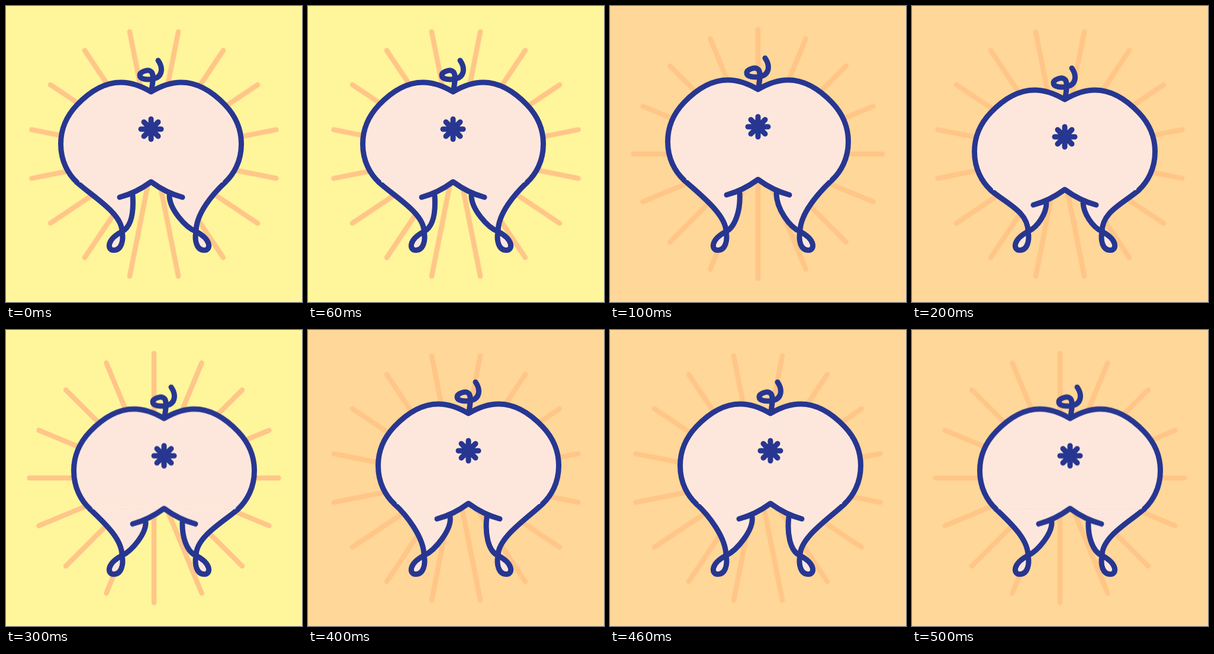
Animation, 500 px wide and 500 px high, one loop 600 ms. Source, as an HTML page without scripts:

```html
<!DOCTYPE html>
<html lang="en">
<head>
<meta charset="utf-8">
<title>Wiggle</title>
<style>
  html, body { margin: 0; width: 100%; height: 100%; overflow: hidden; }
  svg {
    display: block; width: 100%; height: 100%;
    fill: none; stroke: #273691; stroke-width: 9;
    stroke-linecap: round; stroke-linejoin: round;
  }
  svg, .rays, .body, .leg { animation: .6s step-end infinite; }
  svg { animation-name: flash; animation-duration: .3s; }
  .rays {
    stroke: #ffc688; stroke-width: 8.5; transform-origin: 250px 250px;
    animation-name: spin; animation-duration: .2s;
  }
  .body { animation-name: sway; }
  .left { animation-name: left; }
  .right { animation-name: right; }
  .skin { fill: #fde7dd; }

  @keyframes flash {
    0% { background: #fff59b; }
    33.33%, to { background: #ffd798; }
  }
  @keyframes spin {
    0% { transform: rotate(11.25deg); }
    50%, to { transform: none; }
  }
  @keyframes sway {
    0% { transform: translate(-5px, 4px); }
    16.66% { transform: translate(0, 0); }
    33.33% { transform: translate(8px, 17px); }
    50%, 83.33%, to { transform: translate(17px, 8.5px); }
    66.66% { transform: translate(21px, 0); }
  }
  /* outer thigh, ankle, inner thigh */
  @keyframes left {
    0% { d: path("M120 298C145 321 196 350 196 381C211 373 216 350 214 320"); }
    16.66% { d: path("M125 294C150 317 196 352 196 381C211 374 221 345 219 316"); }
    33.33% { d: path("M133 311C158 333 196 347 196 381C213 373 227 350 227 333"); }
    50%, 83.33%, to { d: path("M142 302.5C164 324 196 352 196 381C214 372 237 343 236 324.5"); }
    66.66% { d: path("M146 294C165 311 196 350 196 381C215 372 243 337 240 316"); }
  }
  @keyframes right {
    0% { d: path("M370 298C350 317 321 350 321 381C303 374 276 343 276 320"); }
    16.66% { d: path("M375 294C354 314 321 350 321 381C304 374 281 343 281 316"); }
    33.33% { d: path("M383 311C358 333 321 347 321 381C304 373 290 350 289 333"); }
    50%, 83.33%, to { d: path("M392 302.5C371 322 321 348 321 381C304 374 297 346 298 324.5"); }
    66.66% { d: path("M396 294C371 318 321 350 321 381C303 373 299 341 302 316"); }
  }
</style>
</head>
<body>
<svg viewBox="0 0 500 500">
  <defs>
    <path id="ray" d="M250 39.5V460.5"/>
    <g id="fan">
      <use href="#ray"/>
      <use href="#ray" transform="rotate(22.5 250 250)"/>
      <use href="#ray" transform="rotate(45 250 250)"/>
      <use href="#ray" transform="rotate(67.5 250 250)"/>
    </g>
    <path id="foot" class="skin" d="M196 381C199 396 195 412.5 182 412.5C171 412.5 169 395 196 381"/>
  </defs>

  <g class="rays">
    <use href="#fan"/>
    <use href="#fan" transform="rotate(90 250 250)"/>
  </g>

  <path class="body skin" stroke="none" d="M125 294L197 319 250 293 303 319 375 294Z"/>

  <use href="#foot"/>
  <use href="#foot" transform="matrix(-1 0 0 1 517 0)"/>
  <path class="leg left skin" d="M125 294C150 317 196 352 196 381C211 374 221 345 219 316"/>
  <path class="leg right skin" d="M375 294C354 314 321 350 321 381C304 374 281 343 281 316"/>

  <g class="body">
    <path class="skin" d="M125 294C110 280 97.500 258 97.500 229C97.500 204 106 183 125 163C147 140 171 125 199 125C218 125 235 132 250 141C265 132 282 125 301 125C329 125 353 140 375 163C394 183 402.500 204 402.500 229C402.500 258 390 280 375 294"/>
    <path d="M197 319Q224 312 250 293Q276 312 303 319"/>
    <path d="M262 88C271 101 269 116 254 119C243 121 231 120 231 113C231 107 244 103 249 106C256 110 253 125 250.500 140"/>
    <path d="M250 187v34M233 204h34M238 192l24 24M262 192l-24 24"/>
  </g>
</svg>
</body>
</html>
```
